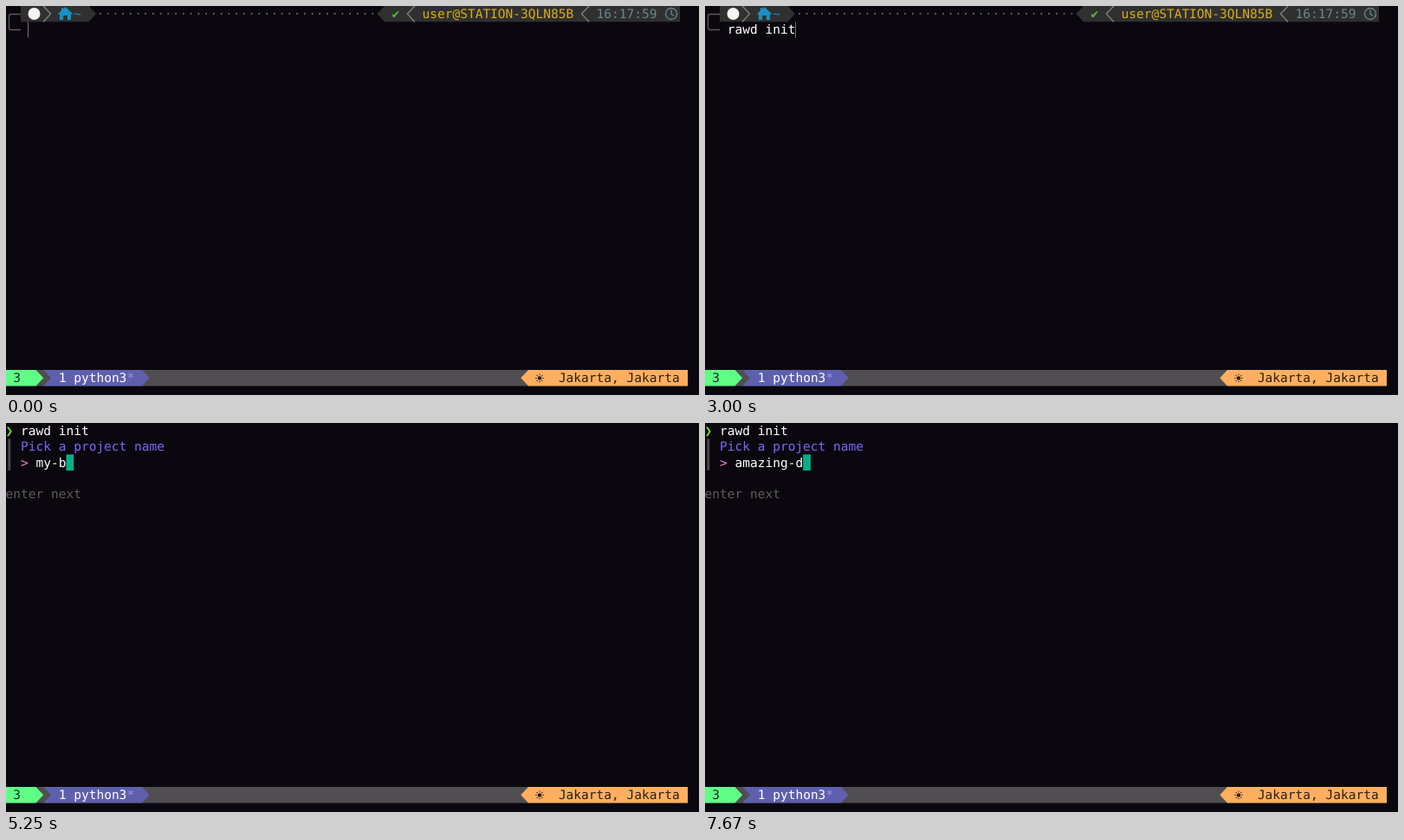
An HTML page that plays this animation: 800x450 px, repeating every 8000 ms.

```html
<!DOCTYPE html>
<html lang="en">
<head>
<meta charset="utf-8">
<title>Terminal session</title>
<style>
  html, body { margin: 0; height: 100%; overflow: hidden; background: #0a080e; }
  svg { display: block; width: 800px; height: 450px; }
  text {
    font: 14.53px "DejaVu Sans Mono", "Liberation Mono", monospace;
    white-space: pre;
    text-rendering: geometricPrecision;
  }
  .line { fill: none; stroke-width: 1.3; }
</style>
</head>
<body>
<svg id="stage" viewBox="0 0 800 450">
  <g id="status"></g>
  <g id="prompt"></g>
  <g id="command"></g>
  <g id="form"></g>
</svg>
<script>
const CELL = 8.745, ROW = 18.3, LOOP = 8000;
const $ = id => document.getElementById(id);
const colX = col => col * CELL - 0.5;

function add(parent, tag, attrs, content = "") {
  const el = document.createElementNS("http://www.w3.org/2000/svg", tag);
  for (const key in attrs) el.setAttribute(key, attrs[key]);
  el.textContent = content;
  return parent.appendChild(el);
}
const text = (parent, col, row, fill, content) =>
  add(parent, "text", { x: colX(col), y: row * ROW + 14, fill }, content);
const rect = (parent, x, y, width, height, fill) =>
  add(parent, "rect", { x, y, width, height, fill });
const shape = (parent, d, fill) => add(parent, "path", { d, fill });
const line = (parent, d, stroke) => add(parent, "path", { d, stroke, class: "line" });

// Status bar
const status = $("status");
rect(status, 0, 421, 787, 18.6, "#504e50");
shape(status, "M0 421H34.5L43.2 430.3L34.5 439.6H0Z", "#5fff87");
shape(status, "M43.2 421H157L165.7 430.3L157 439.6H43.2L52 430.3Z", "#5f5faf");
shape(status, "M787 421H603L594.3 430.3L603 439.6H787Z", "#ffaf5f");
text(status, 1, 23, "#1c2a20", "3");
text(status, 7, 23, "#ffffff", "1 python3");
text(status, 16, 23, "#a58cf0", "*");
text(status, 73, 23, "#2a2018", "Jakarta, Jakarta");
add(status, "circle", { cx: 616, cy: 430.5, r: 2.3, fill: "#2a2018" });
for (let i = 0; i < 8; i++)
  add(status, "path", {
    d: "M3.3 0H4.8", stroke: "#2a2018",
    transform: `translate(616 430.5) rotate(${i * 45})`
  });

// Two-line shell prompt
const prompt = $("prompt");
line(prompt, "M17 9.5H6Q3.5 9.5 3.5 12V25Q3.5 27.5 6 27.5H17", "#5a5a5a");
shape(prompt, "M17 0H95.5L104 9.1L95.5 18.2H17Z", "#303030");
shape(prompt, "M778 0H437L428.3 9.1L437 18.2H778Z", "#303030");
add(prompt, "circle", { cx: 32.5, cy: 9, r: 7, fill: "#f4f4f4" });
line(prompt, "M43.2 0L51.5 9.1L43.2 18.2", "#858585");
shape(prompt, "M68.5 1L77.5 9.5H75V16H70.8V11H66.2V16H62V9.5H59.5L64 5.2V2H66V3.4Z", "#1a8fc4");
text(prompt, 9, 0, "#1a8fc4", "~");
text(prompt, 12, 0, "#5e5e5e", "·".repeat(37));
text(prompt, 51, 0, "#4fbf3a", "✔");
for (const x of [463.3, 664.5])
  line(prompt, `M${x + 8.5} 0L${x} 9.1L${x + 8.5} 18.2`, "#858585");
text(prompt, 55, 0, "#d7af1a", "user@STATION-3QLN85B");
text(prompt, 78, 0, "#6a868c", "16:17:59");
add(prompt, "circle", { cx: 768, cy: 9, r: 6.5, stroke: "#6a868c", class: "line" });
line(prompt, "M768 4.5V9.3L771 11.3", "#6a868c");
const typed = text(prompt, 3, 1, "#ffffff", "");
const caret = rect(prompt, 0, 18.3, 1, 18.3, "#707070");

// Submitted command
const command = $("command");
text(command, 0, 0, "#6fdc35", "❯");
text(command, 2, 0, "#ffffff", "rawd init");

// Project name form
const form = $("form");
rect(form, 2.4, 18.3, 2.8, 36.6, "#4a4a4a");
text(form, 2, 1, "#7d66f8", "Pick a project name");
text(form, 2, 2, "#f780d2", ">");
text(form, 0, 4, "#5c5c5c", "enter next");
const block = rect(form, 0, 36.4, CELL, 18.6, "#0aae86");
const field = text(form, 4, 2, "#ffffff", "");

// [time, characters shown]
const shellKeys = [[420, 1], [670, 2], [830, 3], [1000, 4], [1920, 5], [2500, 6], [2670, 8], [3000, 9]];
const eraseTimes = [4920, 5080, 5250, 5420, 5500, 5750, 5830];
const nameTimes = [6580, 6750, 6830, 6920, 7000, 7170, 7250, 7420, 7670];
const passed = (times, t) => times.filter(at => at <= t).length;
const show = (el, on) => el.setAttribute("visibility", on ? "inherit" : "hidden");

function draw(t) {
  show(prompt, t < 3250);
  show(command, t >= 3250);
  show(form, t >= 3500);

  const count = shellKeys.reduce((n, [at, shown]) => at <= t ? shown : n, 0);
  typed.textContent = "rawd init".slice(0, count);
  caret.setAttribute("x", Math.round(colX(3 + count) - 0.5));

  const name = t < nameTimes[0]
    ? "my-blog".slice(0, 7 - passed(eraseTimes, t))
    : "amazing-d".slice(0, passed(nameTimes, t));
  field.textContent = name;
  block.setAttribute("x", colX(4 + name.length));
  const blinkedOff = (t >= 3920 && t < 4580) || (t >= 6420 && t < 6580);
  show(block, !blinkedOff);
}

const start = performance.now();
function tick() {
  draw((performance.now() - start) % LOOP);
  requestAnimationFrame(tick);
}
tick();
</script>
</body>
</html>
```
